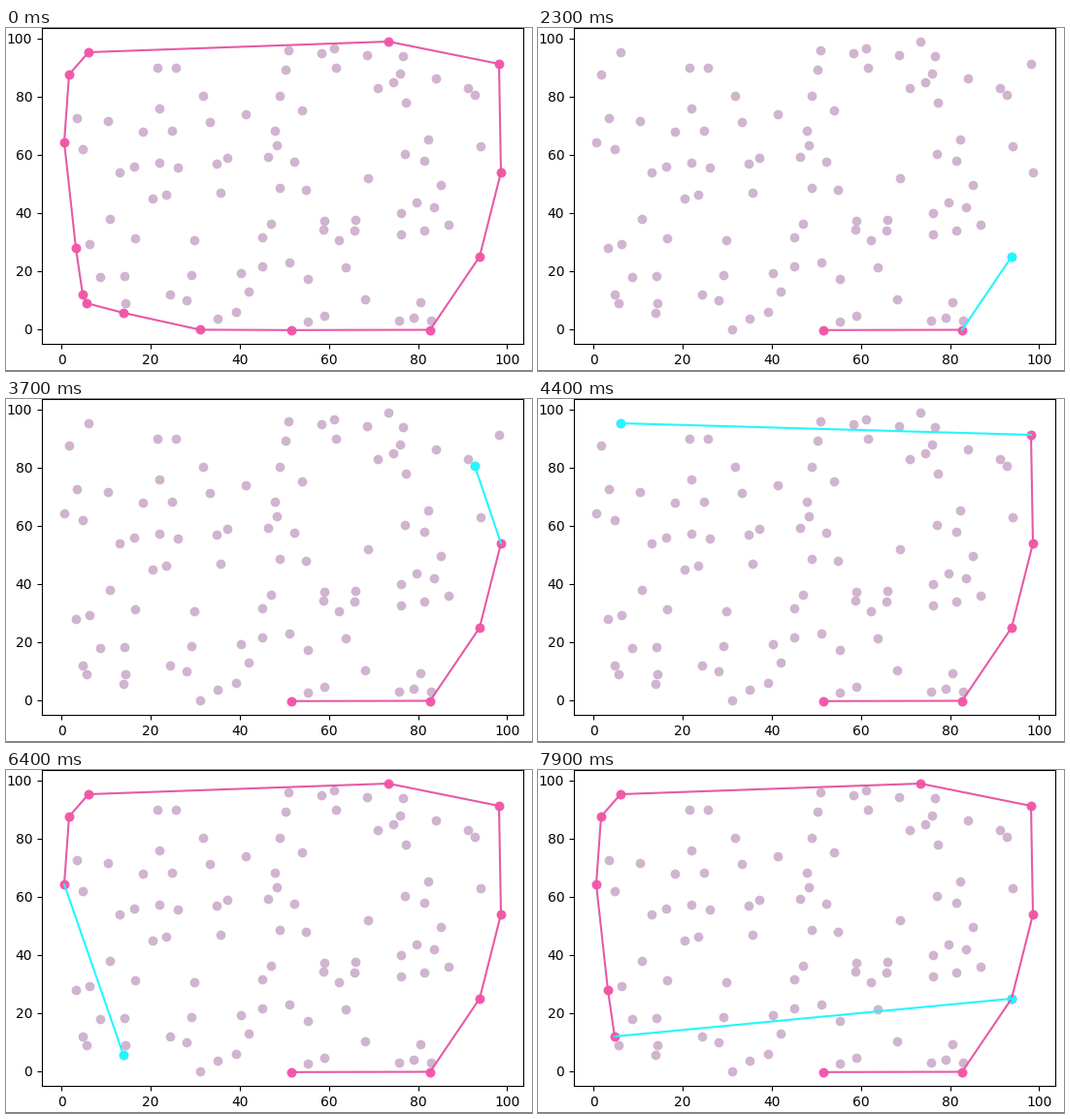
A matplotlib script that plays this animation: 542 by 354 pixels, repeating every 8000 ms.

```python
import math
import random

import matplotlib.pyplot as plt
from matplotlib.animation import FuncAnimation
from matplotlib.lines import Line2D
from matplotlib.path import Path

W, H, DPI = 542, 354, 100
FRAMES, INTERVAL = 80, 100
MAUVE, PINK, LINE, CYAN = "#d0b4d0", "#f659a9", "#e65aa6", "#24f6ff"

# Points that steer the wrapping, in scan order and stage pixels.
KEYS = [(132, 143), (141, 107), (203, 70), (65, 48), (156, 41), (85, 25),
        (488, 236), (510, 149), (406, 47), (443, 52), (483, 69), (508, 37),
        (325, 26), (372, 28), (394, 14), (311, 259), (405, 301.6),
        (438, 302), (437, 311.5), (60, 118), (218, 300), (121, 294),
        (79, 275), (72, 227), (83, 284), (200, 311.4), (294, 311.8)]
TOTAL = 100
# Frame at which the wrapping leaves each hull point in turn.
STARTS = [10, 18, 26, 31, 39, 49, 56, 59, 61, 67, 77]


def turn(a, b, c):
    """Negative when c lies clockwise of the ray a-b as seen on stage."""
    return (b[0] - a[0]) * (c[1] - a[1]) - (b[1] - a[1]) * (c[0] - a[0])


def gift_wrap(points):
    """Hull points, and for each the ever better candidates tried from it."""
    hull, trials = [max(points, key=lambda p: p[1])], []
    while True:
        here = hull[-1]
        tried = []
        for p in points:
            if p != here and (not tried or turn(here, tried[-1], p) > 0):
                tried.append(p)
        trials.append(tried)
        if tried[-1] == hull[0]:
            return hull, trials
        hull.append(tried[-1])


def scatter_inside(hull, taken, count):
    """Seeded points within the hull, denser to the right, hardly touching."""
    rng = random.Random(12)
    cx, cy = 285, 165
    inner = Path([(cx + 0.97 * (x - cx), cy + 0.97 * (y - cy))
                  for x, y in hull])
    points = list(taken)
    while len(points) < count:
        p = 60 + 450 * rng.random() ** 0.7, 14 + 295 * rng.random()
        if inner.contains_point(p) and all(math.dist(p, q) > 9
                                           for q in points):
            points.append(p)
    return points


HULL, TRIALS = gift_wrap(KEYS)
POINTS = scatter_inside(HULL, KEYS, TOTAL)

fig = plt.figure(figsize=(W / DPI, H / DPI), dpi=DPI, facecolor="white")
left, right, bottom, top = 37, 533, 326, 0
ax = fig.add_axes([left / W, 1 - bottom / H,
                   (right - left) / W, (bottom - top) / H])
ax.set_xlim(left, right)
ax.set_ylim(bottom, top)
labels = [str(20 * k) for k in range(6)]
ax.set_xticks([57.2 + 91.85 * k for k in range(6)], labels)
ax.set_yticks([311 - 60 * k for k in range(6)], labels)
fig.add_artist(Line2D([0, 1], [1 / H, 1 / H], color="#808080", lw=0.72))


def dots(points, color, zorder):
    return ax.scatter(*zip(*points), s=36, color=color, zorder=zorder)


def path(color, zorder):
    return ax.plot([], [], color=color, lw=1.5, zorder=zorder)[0]


dots(POINTS, MAUVE, 1)
hull_dots, probe_dot = dots(HULL, PINK, 1.2), dots(HULL[:1], CYAN, 1.4)
hull_line, probe_line = path(LINE, 2), path(CYAN, 2.2)
area = ax.fill(*zip(*HULL), color=PINK, lw=0, zorder=0.5)[0]


def draw(frame):
    wrapping = frame >= STARTS[0]
    if wrapping:
        stage = sum(start <= frame for start in STARTS) - 1
        tried = TRIALS[stage]
        probe = tried[min(frame - STARTS[stage], len(tried) - 1)]
        done = outline = HULL[:stage + 1]
        probe_dot.set_offsets([probe])
        probe_line.set_data(*zip(done[-1], probe))
        area.set_alpha(0)
    else:
        done, outline = HULL, HULL + HULL[:1]
        area.set_alpha(min(frame, 2) * 0.1)
    probe_dot.set_visible(wrapping)
    probe_line.set_visible(wrapping)
    hull_dots.set_offsets(done)
    hull_line.set_data(*zip(*outline))
    return hull_dots, hull_line, probe_dot, probe_line, area


anim = FuncAnimation(fig, draw, frames=FRAMES, interval=INTERVAL,
                     repeat=True, repeat_delay=0, blit=False)
plt.show()
```
